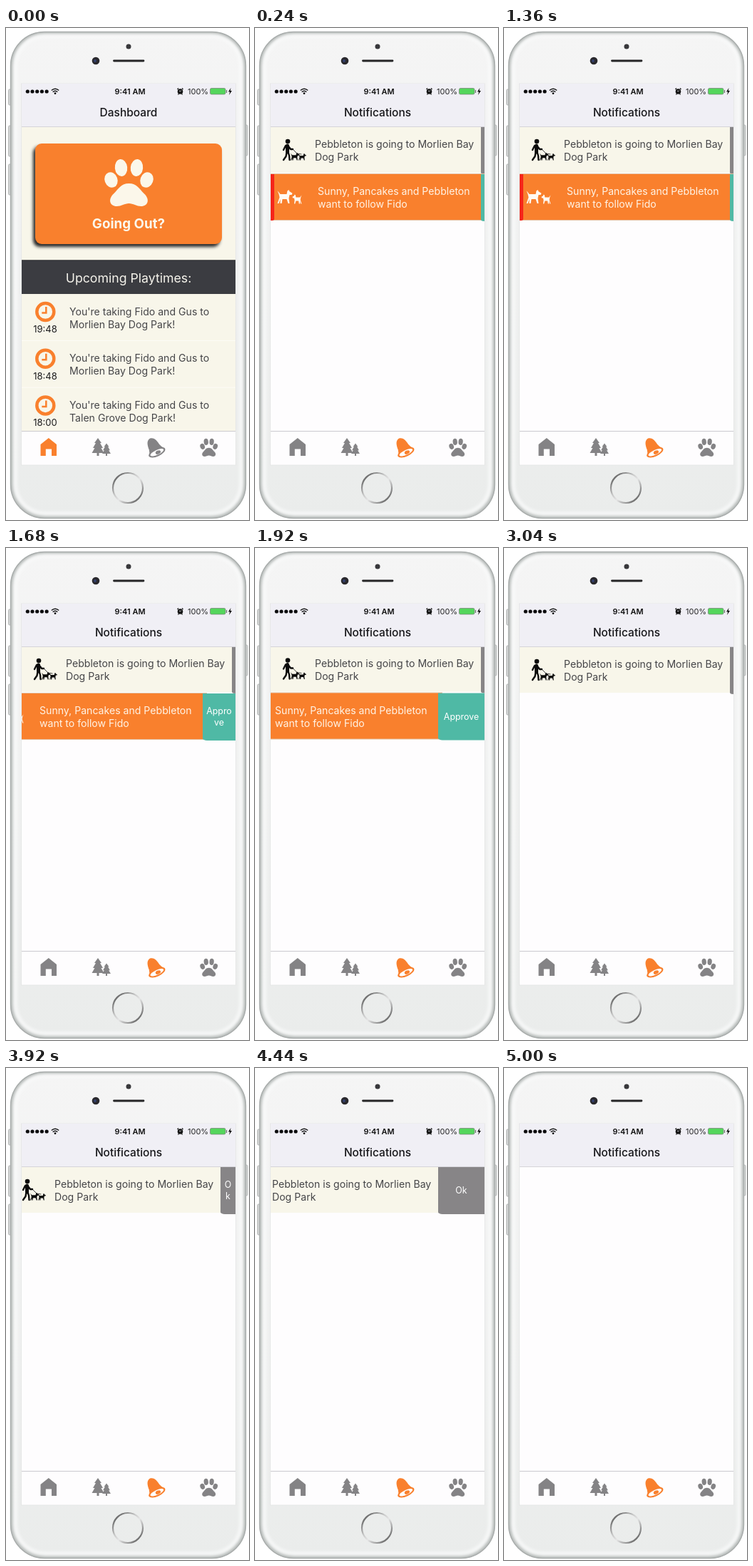
These frames come from a looping animation (341x690 px, 5.04 s). An HTML page:

```html
<!DOCTYPE html>
<html lang="en">
<head>
<meta charset="utf-8">
<title>Dog park app</title>
<style>
  html, body { margin: 0; width: 100%; height: 100%; overflow: hidden; background: #fff; }
  body { position: relative; font-family: Inter, sans-serif; }
  svg { display: block; position: absolute; left: 0; top: 0; overflow: visible; }
  text { font-family: Inter, sans-serif; }
  .mid { text-anchor: middle; }
  .body { font-size: 14.1px; fill: #454548; }
  .tab { fill: #848385; }
  .tab.on { fill: #f9802d; }
  #list { position: absolute; left: 22px; top: 139px; width: 300px; height: 426px; overflow: hidden; }
  #scroll { position: absolute; left: 0; top: 0; width: 300px; }
  .row { position: absolute; left: 0; width: 300px; height: 66px; }
  .face { position: absolute; left: 0; top: 0; width: 300px; height: 64px; }
  .face p { position: absolute; top: 14.5px; margin: 0; font-size: 14.1px; line-height: 18px; white-space: nowrap; }
  #going .face { background: #f8f6ea; color: #454548; }
  #going p { left: 62px; }
  #follow { top: 66px; }
  #follow .face { background: #f9802d; color: #fff3e6; box-shadow: 0 0 0 1px #e3bfa0; }
  #follow p { left: 66px; }
  .deny { position: absolute; left: 0; top: 0; width: 5px; height: 65px; background: #f5251a; border-bottom-right-radius: 4px 2px; }
  .action { position: absolute; right: 0; top: 0; height: 66px; box-sizing: border-box;
    display: flex; align-items: center; justify-content: center; overflow: hidden; text-align: center;
    border-bottom-left-radius: 6px 3px; color: #fff; font-size: 12.4px; line-height: 16px; word-break: break-all; }
  #going .action { background: #878587; }
  #follow .action { background: #4fb9a5; }
</style>
</head>
<body>
<svg width="341" height="690" viewBox="0 0 341 690">
  <defs>
    <linearGradient id="glass" x2="0" y2="1">
      <stop offset="0" stop-color="#f5f5f5"/><stop offset="1" stop-color="#eaeceb"/>
    </linearGradient>
    <linearGradient id="ring" x2="1" y2="1">
      <stop offset="0" stop-color="#3c3c3c"/><stop offset=".4" stop-color="#c9c9c9"/>
      <stop offset=".55" stop-color="#e6e6e6"/><stop offset="1" stop-color="#3c3c3c"/>
    </linearGradient>
    <filter id="soft" x="-10%" y="-10%" width="120%" height="120%"><feGaussianBlur stdDeviation="2"/></filter>
    <clipPath id="shell"><rect x="6" y="5" width="331" height="683" rx="48"/></clipPath>
    <clipPath id="view"><rect x="22" y="139" width="300" height="427"/></clipPath>
    <g id="paw">
      <ellipse cx="-25" cy="-3" rx="9" ry="11" transform="rotate(-20 -25 -3)"/>
      <ellipse cx="-11" cy="-20" rx="8.7" ry="12" transform="rotate(-6 -11 -20)"/>
      <ellipse cx="11" cy="-20" rx="8.7" ry="12" transform="rotate(6 11 -20)"/>
      <ellipse cx="25" cy="-3" rx="9" ry="11" transform="rotate(20 25 -3)"/>
      <path d="M0 2c11 0 15 8 21 14c9 8 6 18-4 18c-6 0-11-4-17-4s-11 4-17 4c-10 0-13-10-4-18c6-6 10-14 21-14z"/>
    </g>
    <path id="tree" d="M0-13L5-6H3L7 1H4.500L8.500 8H1.500V12H-1.500V8H-8.500L-4.500 1H-7L-3-6H-5Z"/>
    <path id="dog" d="M0 1L2 3L4 5H13L14 1L16 0L17 2L21 4L20 6H17L16 10L17 16H15L13 11H7L6 16H4V11L2 16H0L3 9L2 5Z"/>
    <g id="clock">
      <circle r="12" fill="none" stroke="#f9802d" stroke-width="4.500"/>
      <path d="M1-7V1.500H-5" fill="none" stroke="#f9802d" stroke-width="2.500"/>
    </g>
  </defs>

  <g fill="#d5d7d7" stroke="#a9acab" stroke-width=".8">
    <rect x="3.500" y="86" width="4" height="22" rx="1.500"/>
    <rect x="3.500" y="137" width="4" height="43" rx="1.500"/>
    <rect x="3.500" y="191" width="4" height="43" rx="1.500"/>
    <rect x="335" y="136" width="4" height="43" rx="1.500"/>
  </g>
  <g clip-path="url(#shell)" fill="none">
    <rect x="6" y="5" width="331" height="683" fill="url(#glass)"/>
    <rect x="7" y="6" width="329" height="681" rx="47" stroke="#b3b8b6" stroke-width="6" filter="url(#soft)"/>
    <rect x="13" y="11" width="317" height="670" rx="42" stroke="#fbfcfc" stroke-width="4" filter="url(#soft)"/>
  </g>
  <rect x="6.500" y="5.500" width="330" height="682" rx="47.500" fill="none" stroke="#a9adac" stroke-width="1.400"/>
  <circle cx="172" cy="26" r="3.500" fill="#38383b"/>
  <circle cx="126" cy="46" r="5.300" fill="#29282d"/>
  <circle cx="125" cy="46" r="2" fill="#34406c"/>
  <path d="M151.500 46H193" stroke="#252526" stroke-width="2.800" stroke-linecap="round"/>
  <circle cx="171" cy="645" r="21" fill="none" stroke="url(#ring)" stroke-width="2.200"/>

  <rect x="21.500" y="78" width="301" height="535" fill="#fefdfe" stroke="#e0e1e1" stroke-width=".7"/>
  <rect x="22" y="78" width="300" height="61" fill="#f0eff5"/>
  <g id="signal"></g>
  <g fill="none" stroke="#111" stroke-width="1.400">
    <path d="M63.800 87.500Q69 82.800 74.200 87.500M65.700 89.700Q69 86.700 72.300 89.700"/>
    <circle cx="69" cy="91.700" r=".7" fill="#111"/>
  </g>
  <text class="mid" x="174" y="92.500" font-size="11" font-weight="600" fill="#111">9:41 AM</text>
  <circle cx="244.500" cy="89" r="3.800" fill="#151515"/>
  <path d="M240.500 86L242 84.500M248.500 86L247 84.500M241.500 93.500L242.500 92M247.500 93.500L246.500 92" stroke="#151515" stroke-width="1.300"/>
  <path d="M244.500 89L246 87.500M244.500 89L243 88" stroke="#f0eff5" stroke-width=".8"/>
  <text x="255" y="92.500" font-size="11" fill="#222">100%</text>
  <rect x="286.500" y="84.500" width="21.500" height="8.500" rx="1.800" fill="#54d65c" stroke="#777c78" stroke-width=".7"/>
  <path d="M309.500 87V91" stroke="#777c78" stroke-width="1.300"/>
  <path d="M315.500 84L312 89.500H314.200L313 94L317 88H314.800Z" fill="#111"/>
  <text id="title" class="mid" x="172" y="124" font-size="15.500" font-weight="500" fill="#17171a"></text>
  <path d="M22 138.500H322" stroke="#d5d4d9"/>

  <g id="dashboard" clip-path="url(#view)">
    <rect x="22" y="139" width="300" height="427" fill="#f8f6ea"/>
    <rect x="38" y="166" width="262" height="141" rx="9" fill="#29292b" filter="url(#soft)"/>
    <rect x="41" y="162" width="262" height="141" rx="9" fill="#f9802d"/>
    <use href="#paw" x="172.500" y="216" fill="#fbf7ea"/>
    <text class="mid" x="172" y="281" font-size="18.800" font-weight="700" fill="#fcf8ec">Going Out?</text>
    <rect x="22" y="326" width="300" height="47" fill="#3b3c41"/>
    <path d="M22 325.800H322" stroke="#242529"/>
    <text class="mid" x="172" y="357" font-size="17.700" fill="#f6f4ec">Upcoming Playtimes:</text>
    <g id="playtimes"></g>
  </g>

  <path d="M22 565.500H322" stroke="#cbcacf"/>
  <path id="home" class="tab" d="M59.800 575L71 584V600H64V590.500H55.800V600H48.500V584Z"/>
  <g class="tab">
    <use href="#tree" transform="translate(129 588)"/>
    <use href="#tree" transform="translate(141 591.500) scale(.7)"/>
  </g>
  <g id="bell" class="tab" transform="translate(208.500 588) rotate(-25)">
    <path d="M-1-14C6-13 7-6 8 0Q9 4 12.500 8H-12.500Q-9 4-8.500 0C-8-6-7-13-1-14Z"/>
    <ellipse cy="8" rx="12.500" ry="5.500"/>
    <ellipse cy="8" rx="10.200" ry="3.400" fill="#fefdfe"/>
    <ellipse cx="1.500" cy="8.500" rx="3.800" ry="2.500"/>
  </g>
  <use href="#paw" class="tab" transform="translate(284.700 588) scale(.36 .38)"/>
</svg>

<div id="list"><div id="scroll">
  <div id="going" class="row">
    <div class="face">
      <svg width="300" height="64">
        <g fill="none" stroke="#0b0b0b" stroke-linecap="round" stroke-linejoin="round">
          <circle cx="24" cy="20" r="3.300" fill="#0b0b0b" stroke="none"/>
          <path d="M23.500 26V35" stroke-width="5"/>
          <path d="M22.500 35L21.500 41L18 46M24.500 35L26 40L26.500 46M21 26L18 32M25 27L28 31L31 31" stroke-width="2.400"/>
          <path d="M31 31L37 37L43 38" stroke-width=".8"/>
        </g>
        <g fill="#0b0b0b">
          <use href="#dog" transform="translate(28 36) scale(.58 .66)"/>
          <use href="#dog" transform="translate(39 37) scale(.52 .6)"/>
        </g>
      </svg>
      <p>Pebbleton is going to Morlien Bay<br>Dog Park</p>
    </div>
    <div class="action">Ok</div>
  </div>
  <div id="follow" class="row">
    <div class="face">
      <svg width="300" height="64">
        <g fill="#fffaf3">
          <use href="#dog" transform="translate(9.500 22) scale(1 1.180)"/>
          <use href="#dog" transform="translate(43.500 28.500) scale(-.62 .82)"/>
        </g>
      </svg>
      <p>Sunny, Pancakes and Pebbleton<br>want to follow Fido</p>
      <div class="deny"></div>
    </div>
    <div class="action">Approve</div>
  </div>
</div></div>

<script>
const LOOP = 5040, STEP = 40;
const OPEN_LIST = 160, APPROVED = 2680, CONFIRMED = 4600;
const EDGE = 5;

// [time, value] pairs
const followSwipe = [[1480, 0], [1560, 14], [1720, 50], [1800, 60]];
const goingSwipe = [[3840, 0], [3920, 16], [4080, 52], [4160, 60]];
const scrollShift = [[1520, 0], [1760, -1.5], [2040, -1.5], [2200, 0]];

const $ = id => document.getElementById(id);

function valueAt(keys, time) {
  if (time <= keys[0][0]) return keys[0][1];
  for (let i = 1; i < keys.length; i++) {
    const [t0, v0] = keys[i - 1], [t1, v1] = keys[i];
    if (time <= t1) return v0 + (v1 - v0) * (time - t0) / (t1 - t0);
  }
  return keys[keys.length - 1][1];
}

$('signal').innerHTML = [0, 1, 2, 3, 4]
  .map(i => `<circle cx="${30.3 + i * 6.7}" cy="89" r="2.6" fill="#0c0c0d"/>`).join('');

$('playtimes').innerHTML = [['19:48', 'Morlien Bay'], ['18:48', 'Morlien Bay'], ['18:00', 'Talen Grove']]
  .map(([hour, park], i) => `<g transform="translate(0 ${i * 65.7})">
    <use href="#clock" x="55.3" y="398"/>
    <text class="mid" x="55" y="427" font-size="13" fill="#1c1c1e">${hour}</text>
    <text class="body" x="89" y="402.500">You're taking Fido and Gus to</text>
    <text class="body" x="89" y="420.500">${park} Dog Park!</text>
    <path d="M22 438.500H322" stroke="#fdfcf6"/></g>`).join('');

function swipe(id, offset) {
  const row = $(id), action = row.querySelector('.action');
  const width = EDGE + offset;
  row.querySelector('.face').style.transform = `translateX(${-offset}px)`;
  action.style.width = `${width}px`;
  action.style.padding = `0 ${Math.min(5, width / 4)}px`;
  action.style.fontSize = offset < 8 ? '0' : '';
}

function show(id, visible) {
  $(id).style.display = visible ? '' : 'none';
}

function render(time) {
  const onList = time >= OPEN_LIST;
  show('dashboard', !onList);
  show('list', onList);
  $('title').textContent = onList ? 'Notifications' : 'Dashboard';
  $('home').classList.toggle('on', !onList);
  $('bell').classList.toggle('on', onList);
  show('follow', time < APPROVED);
  show('going', time < CONFIRMED);
  swipe('follow', valueAt(followSwipe, time));
  swipe('going', valueAt(goingSwipe, time));
  $('scroll').style.transform = `translateY(${valueAt(scrollShift, time)}px)`;
}

function tick() {
  render(Math.floor(performance.now() % LOOP / STEP) * STEP);
  requestAnimationFrame(tick);
}
tick();
</script>
</body>
</html>
```
